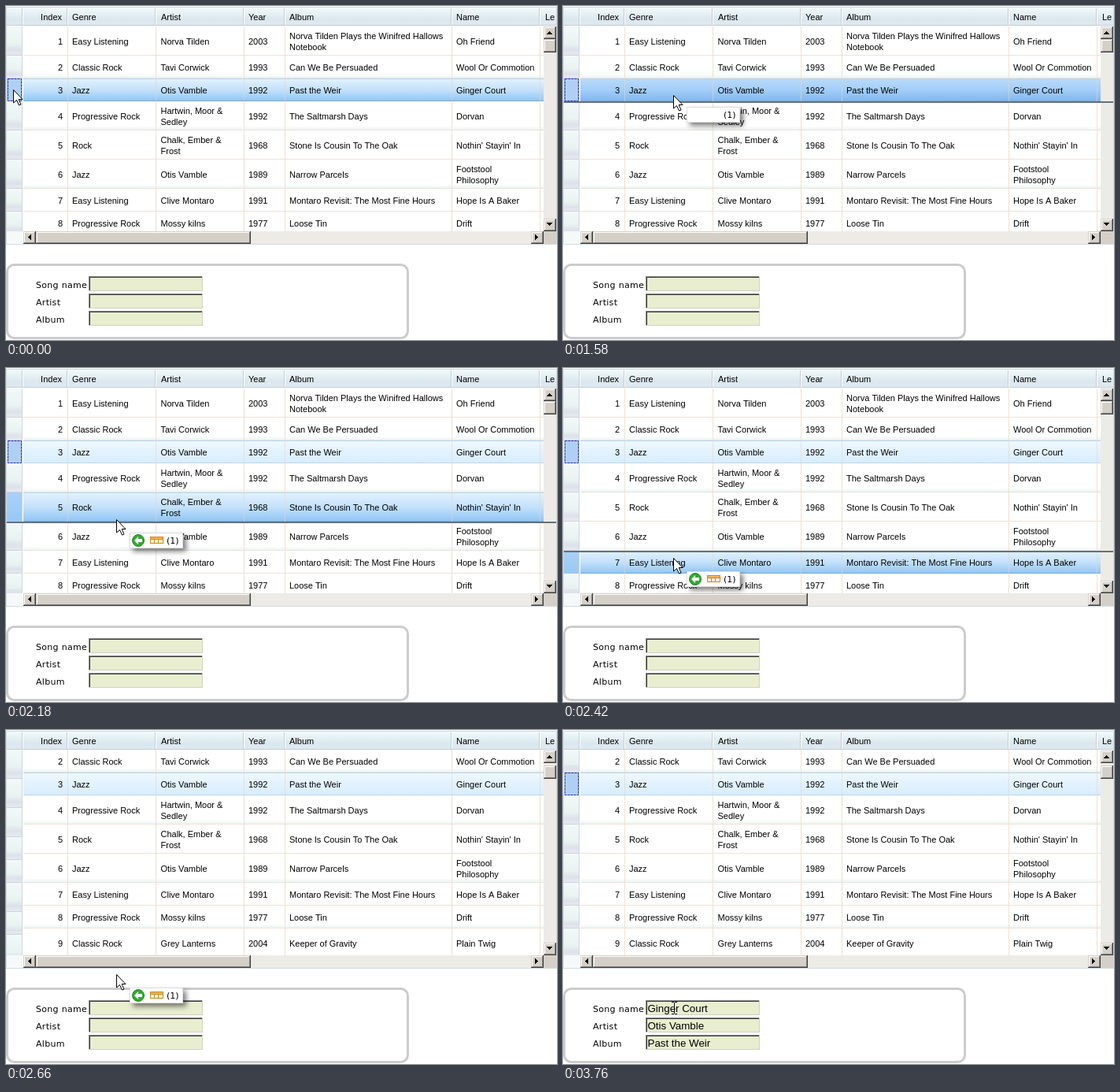
These frames come from a looping animation (700x424 px, 4090 ms). An HTML page with a canvas:

```html
<!DOCTYPE html>
<html lang="en">
<head>
<meta charset="utf-8">
<title>Grid drag and drop</title>
<style>
  html, body { margin: 0; width: 100%; height: 100%; overflow: hidden; background: #fff; }
  canvas { display: block; }
</style>
</head>
<body>
<canvas id="stage" width="700" height="424"></canvas>
<script>
const ctx = document.getElementById('stage').getContext('2d');
const LOOP = 4090, DRAG_START = 1580, STEP = 60, DROP = 3300;
const GRID_TOP = 26, GRID_BOTTOM = 286, GRID_LEFT = 22, GRID_RIGHT = 683;
const GRID_FONT = '11px "Liberation Sans", Arial, sans-serif';
const INPUT_FONT = '13.33px "Liberation Sans", Arial, sans-serif';
const FORM_FONT = '11px "DejaVu Sans", Verdana, sans-serif';

const columns = [
  ['Genre', 84], ['Artist', 197], ['Year', 308], ['Album', 360], ['Name', 572], ['Le', 685]
];
const separators = [78, 190, 302, 354, 566, 678];
const songs = [
  ['Easy Listening', 'Norva Tilden', '2003', 'Norva Tilden Plays the Winifred Hallows|Notebook', 'Oh Friend'],
  ['Classic Rock', 'Tavi Corwick', '1993', 'Can We Be Persuaded', 'Wool Or Commotion'],
  ['Jazz', 'Otis Vamble', '1992', 'Past the Weir', 'Ginger Court'],
  ['Progressive Rock', 'Hartwin, Moor &|Sedley', '1992', 'The Saltmarsh Days', 'Dorvan'],
  ['Rock', 'Chalk, Ember &|Frost', '1968', 'Stone Is Cousin To The Oak', "Nothin' Stayin' In"],
  ['Jazz', 'Otis Vamble', '1989', 'Narrow Parcels', 'Footstool|Philosophy'],
  ['Easy Listening', 'Clive Montaro', '1991', 'Montaro Revisit: The Most Fine Hours', 'Hope Is A Baker'],
  ['Progressive Rock', 'Mossy kilns', '1977', 'Loose Tin', 'Drift'],
  ['Classic Rock', 'Grey Lanterns', '2004', 'Keeper of Gravity', 'Plain Twig'],
  ['Blues', 'Lenny Orb', '1991', "Dead Sure, I've Had The Shakes", 'Nine Slow Weeks'],
  ['Easy Listening', 'Clive Montaro', '1991', 'Montaro Revisit: The Most Fine Hours', 'The Hat You Wore|Indoors']
];
const tallRows = [0, 3, 4, 5, 8, 10];
const SELECTED = 2;
let nextTop = GRID_TOP;
const rows = songs.map((cells, i) => {
  const height = tallRows.includes(i) ? 37 : 29;
  const row = { cells, top: nextTop, height, center: nextTop + Math.ceil(height / 2) };
  nextTop += height;
  return row;
});

const looks = {
  hover: ['#e3f2fe', '#c3e1fb', '#8fc5f4'],
  pressed: ['#b9dafa', '#a3cef8', '#80b7ee'],
  selected: ['#f0f8ff', '#e2f2ff', '#d8edff']
};

// Pointer height by drag step, as [step, y].
const dragPath = [[-1, 106], [4, 140], [8, 167], [14, 241], [16, 271], [17, 299], [21, 343], [22, 354]];

function dragY(step) {
  const i = dragPath.findIndex(([s]) => s >= step);
  if (i <= 0) return dragPath[0][1];
  const [s0, y0] = dragPath[i - 1], [s1, y1] = dragPath[i];
  return Math.round(y0 + (y1 - y0) * (step - s0) / (s1 - s0));
}

const scrollAt = step => step < 16 ? 0 : step < 18 ? 96 : 38;

function rect(x, y, w, h, fill) {
  ctx.fillStyle = fill;
  ctx.fillRect(x, y, w, h);
}

function gradientRect(x, y, w, h, colors) {
  const g = ctx.createLinearGradient(0, y, 0, y + h);
  colors.forEach((c, i) => g.addColorStop(i / (colors.length - 1), c));
  rect(x, y, w, h, g);
}

function text(value, x, centerY, font = GRID_FONT, align = 'left') {
  ctx.font = font;
  ctx.textAlign = align;
  ctx.fillStyle = '#000';
  const lines = value.split('|');
  lines.forEach((line, i) =>
    ctx.fillText(line, x, centerY + 4 + (i - (lines.length - 1) / 2) * 14));
}

function polygon(points, fill, stroke) {
  ctx.beginPath();
  points.forEach(([x, y]) => ctx.lineTo(x, y));
  ctx.closePath();
  ctx.fillStyle = fill;
  ctx.fill();
  if (stroke) {
    ctx.strokeStyle = stroke;
    ctx.lineWidth = 1;
    ctx.stroke();
  }
}

function clipped(x, y, w, h, draw) {
  ctx.save();
  ctx.beginPath();
  ctx.rect(x, y, w, h);
  ctx.clip();
  draw();
  ctx.restore();
}

function drawColumnHeaders() {
  rect(0, 1, 700, 1, '#cbd5dc');
  gradientRect(1, 2, 698, 23, ['#f2f9fb', '#e6f1f5', '#dbe7ee', '#e0e9f0']);
  rect(0, 24, 700, 1, '#c5cdd7');
  for (const x of [21, ...separators]) {
    rect(x - 1, 3, 1, 21, '#c6cbd5');
    rect(x, 3, 1, 21, '#fff');
  }
  text('Index', 71, 14, GRID_FONT, 'right');
  columns.forEach(([label, x]) => text(label, x, 14));
}

function drawRows(scroll, hovered, hoverLook) {
  rows.forEach(({ cells, top, height, center }, i) => {
    const y = top - scroll, textY = center - scroll;
    const look = i === hovered ? hoverLook : i === SELECTED ? 'selected' : null;
    if (look) {
      gradientRect(GRID_LEFT, y, 661, height, looks[look]);
      rect(GRID_LEFT, y, 661, 1, '#b5d8f6');
      rect(GRID_LEFT, y + height - 1, 661, 1, look === 'selected' ? '#b5d8f6' : '#78abd9');
    } else {
      if (i % 2) gradientRect(GRID_LEFT, y + height - 6, 661, 6, ['#fff', '#eaf3f3']);
      rect(GRID_LEFT, y + height - 1, 661, 1, '#ebe3da');
    }
    separators.forEach(x => rect(x, y, 1, height, look ? 'rgba(225,214,200,.6)' : '#eee1d2'));
    text(String(i + 1), 72, textY, GRID_FONT, 'right');
    cells.forEach((cell, c) => text(cell, columns[c][1] + (c === 1 ? -0.5 : 0), textY));
  });
}

function drawRowHeaders(scroll, hovered) {
  rows.forEach(({ top, height }, i) => {
    const y = top - scroll;
    gradientRect(1, y, 20, height, ['#f2f9f8', '#eff7f6', '#ecf4f4', '#e9f1f1', '#dde1e9', '#e8ebf1']);
    rect(1, y + height - 1, 20, 1, '#ced2db');
    if (i === hovered) gradientRect(1, y, 20, height, ['#a9d1f8', '#99c8f4']);
    if (i === SELECTED) {
      rect(2, y, 18, height, '#b0cff5');
      ctx.strokeStyle = '#2430a8';
      ctx.lineWidth = 1;
      ctx.setLineDash([3, 1]);
      ctx.strokeRect(2.5, y + 0.5, 17, height - 1);
      ctx.setLineDash([]);
    }
  });
  rect(20, GRID_TOP, 1, 260, '#cfd6dc');
}

function bevel(x, y, w, h) {
  rect(x, y, w, h, '#404040');
  rect(x, y, w - 1, h - 1, '#d4d0c8');
  rect(x + 1, y + 1, w - 2, h - 2, '#808080');
  rect(x + 1, y + 1, w - 3, h - 3, '#fff');
  rect(x + 2, y + 2, w - 4, h - 4, '#d4d0c8');
}

function scrollButton(x, y, angle) {
  bevel(x, y, 16, 16);
  ctx.save();
  ctx.translate(x + 7.5, y + 7.5);
  ctx.rotate(angle);
  for (let i = 0; i < 4; i++) rect(-0.5 - i, -1.5 + i, 1 + 2 * i, 1, '#000');
  ctx.restore();
}

function drawScrollbars(scroll) {
  rect(GRID_RIGHT, GRID_TOP, 16, 260, '#edebe6');
  scrollButton(GRID_RIGHT, GRID_TOP, 0);
  scrollButton(GRID_RIGHT, 270, Math.PI);
  bevel(GRID_RIGHT, 42 + Math.round(scroll / 12), 16, 17);
  rect(0, GRID_BOTTOM, 700, 17, '#fff');
  rect(1, GRID_BOTTOM, 20, 16, '#f6f9fa');
  rect(GRID_LEFT, GRID_BOTTOM, 661, 16, '#edebe6');
  rect(GRID_RIGHT, GRID_BOTTOM, 16, 16, '#d4d0c8');
  scrollButton(GRID_LEFT, GRID_BOTTOM, -Math.PI / 2);
  scrollButton(667, GRID_BOTTOM, Math.PI / 2);
  bevel(38, GRID_BOTTOM, 273, 16);
  rect(0, 302, 700, 1, '#d3dce2');
  rect(0, 1, 1, 302, '#d3dce2');
  rect(699, 1, 1, 302, '#d3dce2');
}

function drawForm(filled) {
  ctx.strokeStyle = '#ccc';
  ctx.lineWidth = 3;
  ctx.beginPath();
  ctx.roundRect(1.5, 328.5, 509, 93, 9);
  ctx.stroke();
  const { cells } = rows[SELECTED];
  [['Song name', cells[4]], ['Artist', cells[1]], ['Album', cells[3]]].forEach(([label, value], i) => {
    const y = 343 + 22 * i;
    ctx.letterSpacing = '0.3px';
    text(label, 38, y + 11, FORM_FONT);
    ctx.letterSpacing = '0px';
    rect(105, y, 145, 19, '#d4d0c8');
    rect(105, y, 144, 18, '#808080');
    rect(106, y + 1, 143, 17, '#404040');
    rect(107, y + 2, 142, 16, '#e8eecf');
    if (filled) text(value, 107.5, y + 11, INPUT_FONT);
  });
}

function drawDragLabel(x, y, withIcons) {
  ctx.save();
  ctx.shadowColor = 'rgba(0,0,0,.5)';
  ctx.shadowBlur = 6;
  ctx.shadowOffsetX = ctx.shadowOffsetY = 4;
  rect(x, y, 68, 20, '#fff');
  ctx.restore();
  ctx.strokeStyle = '#ddd';
  ctx.lineWidth = 1;
  ctx.strokeRect(x + 0.5, y + 0.5, 67, 19);
  text('(1)', x + 47, y + 10, FORM_FONT);
  if (!withIcons) return;
  const cx = x + 11, cy = y + 10;
  ctx.beginPath();
  ctx.arc(cx, cy, 7.5, 0, 7);
  ctx.fillStyle = '#35a834';
  ctx.fill();
  ctx.strokeStyle = '#218525';
  ctx.stroke();
  polygon([[-5, 0], [0, -5], [0, -2], [5, -2], [5, 2], [0, 2], [0, 5]]
    .map(([dx, dy]) => [cx + dx, cy + dy]), '#fff');
  rect(x + 26, y + 5, 17, 9, '#c8862b');
  rect(x + 27, y + 6, 15, 2, '#f2b653');
  [27, 32, 37].forEach(dx => rect(x + dx, y + 9, dx === 37 ? 5 : 4, 4, '#fff3d6'));
}

function drawArrow(x, y) {
  const shape = [[0, 0], [0, 16.5], [4, 13], [7, 19.5], [9.5, 18.5], [6.7, 12], [11.5, 12]];
  polygon(shape.map(([dx, dy]) => [x + 0.5 + dx, y + 0.5 + dy]), '#fff', '#000');
}

function drawIBeam(x, y, color) {
  rect(x, y - 7, 1, 14, color);
  for (const dy of [-8, 7]) {
    rect(x - 3, y + dy, 3, 1, color);
    rect(x + 1, y + dy, 3, 1, color);
  }
}

function draw(t) {
  const rawStep = Math.floor((t - DRAG_START) / STEP);
  const step = t >= 2970 ? 22 : Math.min(rawStep, 21);
  const dragging = step >= 0 && t < DROP;
  const scroll = scrollAt(step), headerScroll = scrollAt(step - 1);
  const x = t < 400 ? 9 : t < 460 ? 75 : 140;
  const y = dragY(step);

  // The highlight stops following once the pointer reaches the auto-scroll edge.
  const pointedY = Math.min(y, 256) + scroll;
  const hovered = y > GRID_BOTTOM ? -1 : rows.findIndex(r => pointedY < r.top + r.height);
  const hoverLook = hovered === SELECTED && t >= 920 ? 'pressed' : 'hover';

  rect(0, 0, 700, 424, '#fff');
  clipped(0, 0, 699, 25, drawColumnHeaders);
  clipped(0, 25, GRID_RIGHT, 261, () => {
    drawRows(scroll, hovered, hoverLook);
    drawRowHeaders(headerScroll, headerScroll === scroll ? hovered : -1);
  });
  drawScrollbars(scroll);
  if (dragging && hovered >= 0) {
    const { top, height, center } = rows[hovered];
    const lineY = (pointedY > center ? top + height : top) - scroll;
    rect(1, lineY, 698, 2, '#66707a');
  }
  drawForm(t >= DROP);
  if (dragging) drawDragLabel(157, y + (step < 5 ? 15 : 17), step >= 5);
  if (step < 22) drawArrow(x, y);
  else drawIBeam(141, y - 1, t < 3760 ? '#000' : '#17112f');
}

function tick() {
  draw(performance.now() % LOOP);
  requestAnimationFrame(tick);
}
tick();
</script>
</body>
</html>
```
